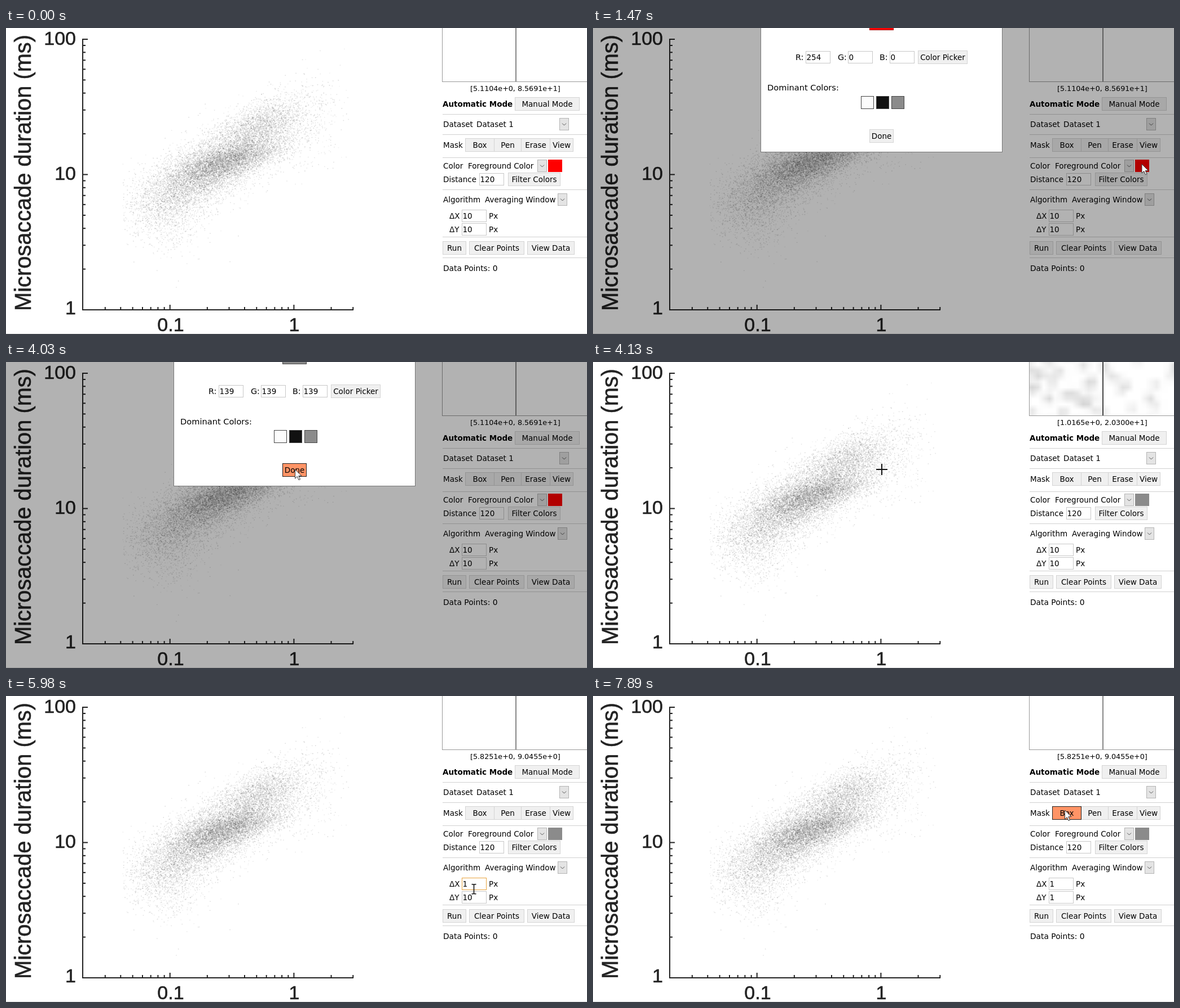
An HTML page with a canvas that plays this animation: 1030 by 544 pixels, repeating every 7990 ms.

```html
<!DOCTYPE html>
<html lang="en">
<head>
<meta charset="utf-8">
<title>Plot digitizing</title>
<style>
html, body { margin: 0; width: 100%; height: 100%; overflow: hidden; background: #fff; }
canvas { display: block; }
</style>
</head>
<body>
<canvas id="stage" width="1030" height="544"></canvas>
<script>
const LOOP = 7990, OPEN = 1470, PICK = 2650, CLOSE = 4130, FOCUS_X = 5110, FOCUS_Y = 6540;
const UI = '"DejaVu Sans", sans-serif', PLOT = '"Liberation Sans", Arial, sans-serif';
const GRAY = '#8b8b8b';
const c = document.getElementById('stage').getContext('2d');

const at = (x, y) => ({ x, y });
const entry = at(982, 486), swatch = at(975, 244), grayChip = at(547, 129), done = at(512, 191);
const fieldX = at(829, 343), above = at(832, 292), fieldY = at(829, 357), boxButton = at(836, 203);

// The pointer rests between moves; bow bends the way, power slows its end
const moves = [
  { from: 100, until: 1000, to: swatch, bow: at(26, 0) },
  { from: OPEN, until: 2300, to: grayChip, bow: at(0, -70), power: 5 },
  { from: 2750, until: 3650, to: done, bow: at(42, 0) },
  { from: 4150, until: 4960, to: fieldX },
  { from: 5980, until: 6200, to: above },
  { from: 6300, until: FOCUS_Y, to: fieldY },
  { from: 6860, until: 7540, to: boxButton }
];

function pointerAt(t) {
  if (t < moves[0].from) return null;
  let p = entry;
  for (const { from, until, to, bow = at(0, 0), power = 1 } of moves) {
    if (t < from) break;
    const k = 1 - (1 - Math.min(1, (t - from) / (until - from))) ** power;
    const arc = Math.sin(Math.PI * k);
    p = at(p.x + (to.x - p.x) * k + bow.x * arc, p.y + (to.y - p.y) * k + bow.y * arc);
  }
  return p;
}

function drawCloud(g) {
  let seed = 7;
  const rand = () => (seed = (seed * 16807) % 2147483647) / 2147483647;
  const normal = () => Math.sqrt(-2 * Math.log(rand())) * Math.cos(2 * Math.PI * rand());
  const cloud = (count, cx, cy, along, across, angle) => {
    const cos = Math.cos(angle), sin = Math.sin(angle);
    for (let i = 0; i < count; i++) {
      const u = normal() * along, v = normal() * across;
      const x = cx + u * cos - v * sin, y = cy + u * sin + v * cos;
      g.fillStyle = `rgba(70,70,70,${0.06 + rand() * 0.14})`;
      if (x > 205 && x < 610 && y < 490) g.fillRect(x, y, 1.6, 1.6);
    }
  };
  cloud(4300, 395, 236, 53, 14, -0.3);
  cloud(6200, 352, 255, 66, 27, -0.55);
  cloud(2100, 452, 172, 40, 19, -0.4);
  cloud(900, 282, 322, 38, 38, -0.6);
  cloud(600, 515, 168, 55, 36, -0.7);
}

function drawAxes(g) {
  g.fillStyle = '#222';
  g.fillRect(135, 19, 2, 483);
  g.fillRect(135, 500, 481, 2);
  for (let decade = 0; decade < 3; decade++)
    for (let k = 1; k < 10; k++) {
      const size = k === 1 ? 9 : 5, power = decade + Math.log10(k);
      const x = 71 + 219.7 * power, y = 501 - 240.5 * power;
      if (y > 18) g.fillRect(136, y - 1, size, 2);
      if (x > 140 && x < 617) g.fillRect(x - 1, 501 - size, 2, size);
    }
}

function drawAxisLabels(g) {
  g.strokeStyle = g.fillStyle = '#222';
  g.lineWidth = 0.6;
  const label = (s, x, y, align) => {
    g.textAlign = align;
    g.fillText(s, x, y);
    g.strokeText(s, x, y);
  };
  g.font = '34px ' + PLOT;
  ['1', '10', '100'].forEach((s, i) => label(s, 124, 509 - 239.5 * i, 'right'));
  ['0.1', '1'].forEach((s, i) => label(s, 292 + 219 * i, 539, 'center'));
  g.rotate(-Math.PI / 2);
  g.font = '39.8px ' + PLOT;
  label('Microsaccade duration (ms)', -503, 44, 'left');
}

function makeChart() {
  const canvas = document.createElement('canvas');
  canvas.width = 760;
  canvas.height = 544;
  const g = canvas.getContext('2d');
  g.fillStyle = '#fff';
  g.fillRect(0, 0, 760, 544);
  drawCloud(g);
  drawAxes(g);
  drawAxisLabels(g);
  return canvas;
}
const chart = makeChart();

function box(x, y, w, h, fill, stroke) {
  c.fillStyle = fill;
  c.fillRect(x, y, w, h);
  c.strokeStyle = stroke;
  c.lineWidth = 1;
  c.strokeRect(x + 0.5, y + 0.5, w - 1, h - 1);
}

function text(s, x, midY, size = 13.5, weight = '') {
  c.font = `${weight} ${size}px ${UI}`;
  c.fillStyle = '#000';
  c.fillText(s, x, midY + 5);
}

const inside = (p, x, y, w, h) => p && p.x >= x && p.x < x + w && p.y >= y && p.y < y + h;

function button(label, x, midY, w, p) {
  const y = midY - 12, hot = inside(p, x, y, w, 24);
  box(x, y, w, 24, hot ? '#ff9466' : '#f0f0f0', hot ? '#222' : '#d4d4d4');
  c.textAlign = 'center';
  text(label, x + w / 2, midY);
  c.textAlign = 'left';
}

function input(value, x, midY, focused) {
  box(x, midY - 11, 44, 22, '#fff', focused ? '#e8a33d' : '#c8c8c8');
  text(value, x + 1.5, midY);
}

function select(label, x, midY, right, p) {
  const left = right - 17, hot = inside(p, x, midY - 11, right - x, 22);
  text(label, x, midY);
  box(left, midY - 11, 17, 22, hot ? '#d0e4f4' : '#e4e4e4', hot ? '#5a9bd0' : '#b4b4b4');
  strokePath('M5-1.5 8.5 2 12-1.5', left, midY, '#555', 1);
}

function strokePath(d, x, y, color, width, fill) {
  const shape = new Path2D(d);
  c.save();
  c.translate(x, y);
  if (fill) {
    c.fillStyle = fill;
    c.fill(shape);
  }
  c.strokeStyle = color;
  c.lineWidth = width;
  c.stroke(shape);
  c.restore();
}

function zoomPanel(cross) {
  box(773, -180, 262, 276, '#fff', '#999');
  if (cross) c.drawImage(chart, cross.x - 13, cross.y + 3, 26, 9.5, 774, 0, 260, 95);
  c.fillStyle = cross ? '#444' : '#888';
  c.fillRect(903, 0, 2, 95);
}

function coordinates(t, cross) {
  if (t < CLOSE) return '[5.1104e+0, 8.5691e+1]';
  if (!cross) return '[5.8251e+0, 9.0455e+0]';
  const x = 10 ** ((cross.x - 511 + 0.56) / 220), y = 10 ** (1 + (264.8 - cross.y) / 240);
  return `[${x.toExponential(4)}, ${y.toExponential(4)}]`;
}

function sidebar(t, p, cross) {
  zoomPanel(cross);
  text(coordinates(t, cross), 823, 107, 12.7);
  c.fillStyle = '#d0d0d0';
  for (const y of [153, 189, 230, 287, 371, 408]) c.fillRect(774, y, 256, 1);

  text('Automatic Mode', 774, 135, 13.5, 'bold');
  button('Manual Mode', 902, 135, 115, p);
  text('Dataset', 775, 171);
  select('Dataset 1', 834, 171, 998, p);

  text('Mask', 775, 208);
  button('Pen', 865, 208, 49, p);
  button('Erase', 913, 208, 52, p);
  button('View', 964, 208, 42, p);
  button('Box', 814, 208, 52, p);

  text('Color', 775, 245);
  select('Foreground Color', 819, 245, 959, p);
  const color = t < CLOSE ? '#f00' : GRAY;
  box(961, 234, 25, 22, color, inside(p, 961, 234, 25, 22) ? '#222' : color);
  text('Distance', 775, 269);
  input('120', 839, 269);
  button('Filter Colors', 890, 269, 93, p);

  text('Algorithm', 775, 305);
  select('Averaging Window', 849, 305, 995, p);
  const editing = t >= FOCUS_X && t < 7660;
  text('ΔX', 786, 334);
  input(t < FOCUS_X + 490 ? '10' : '1', 808, 334, editing && t < FOCUS_Y);
  text('Px', 856, 334);
  text('ΔY', 786, 358);
  input(t < FOCUS_Y + 160 ? '10' : '1', 808, 358, editing && t >= FOCUS_Y);
  text('Px', 856, 358);

  button('Run', 774, 391, 42, p);
  button('Clear Points', 821, 391, 98, p);
  button('View Data', 924, 391, 84, p);
  text('Data Points: 0', 775, 427, 13.8);
}

function dialog(t, p) {
  const picked = t >= PICK;
  c.fillStyle = 'rgba(0,0,0,.3)';
  c.fillRect(0, 0, 1030, 544);
  box(297, -10, 429, 231, '#fff', '#777');
  box(490, -20, 43, 24, picked ? GRAY : '#fe0000', picked ? '#444' : '#b00000');
  ['R:', 'G:', 'B:'].forEach((s, i) => {
    const x = 359 + Math.round(74.5 * i);
    text(s, x, 52, 14.3);
    input(picked ? '139' : i ? '0' : '254', x + 18, 52);
  });
  button('Color Picker', 576, 52, 88, p);
  text('Dominant Colors:', 309, 106, 14.6);
  ['#fcfcfc', '#111', GRAY].forEach((fill, i) => box(475 + i * 27, 121, 23, 23, fill, '#444'));
  button('Done', 490, 192, 43, p);
}

function pointer(p, cross) {
  const typing = inside(p, 808, 323, 44, 46);
  if (cross) strokePath('M-10 0H10M0-10V10', p.x, p.y, '#111', 2);
  else if (typing)
    strokePath('M-4-8H-1L0-7 1-8H4M0-7V8M-4 9H-1L0 8 1 9H4', p.x + 0.5, p.y, '#111', 1.6);
  else
    strokePath('M0 0V16L3.8 12.5 6.5 18.7 9 17.6 6.3 11.6H11.5Z', p.x + 0.5, p.y, '#333', 1, '#fff');
}

function draw(t) {
  const p = pointerAt(t), modal = t >= OPEN && t < CLOSE;
  const cross = t >= CLOSE && p.x < 679 ? p : null;
  c.fillStyle = '#fff';
  c.fillRect(0, 0, 1030, 544);
  c.drawImage(chart, 0, 0);
  c.fillStyle = '#ddd';
  c.fillRect(0, 543, 1030, 1);
  sidebar(t, modal ? null : p, cross);
  if (modal) dialog(t, p);
  if (p) pointer(p, cross);
}

function tick() {
  draw(performance.now() % LOOP);
  requestAnimationFrame(tick);
}
tick();
</script>
</body>
</html>
```
